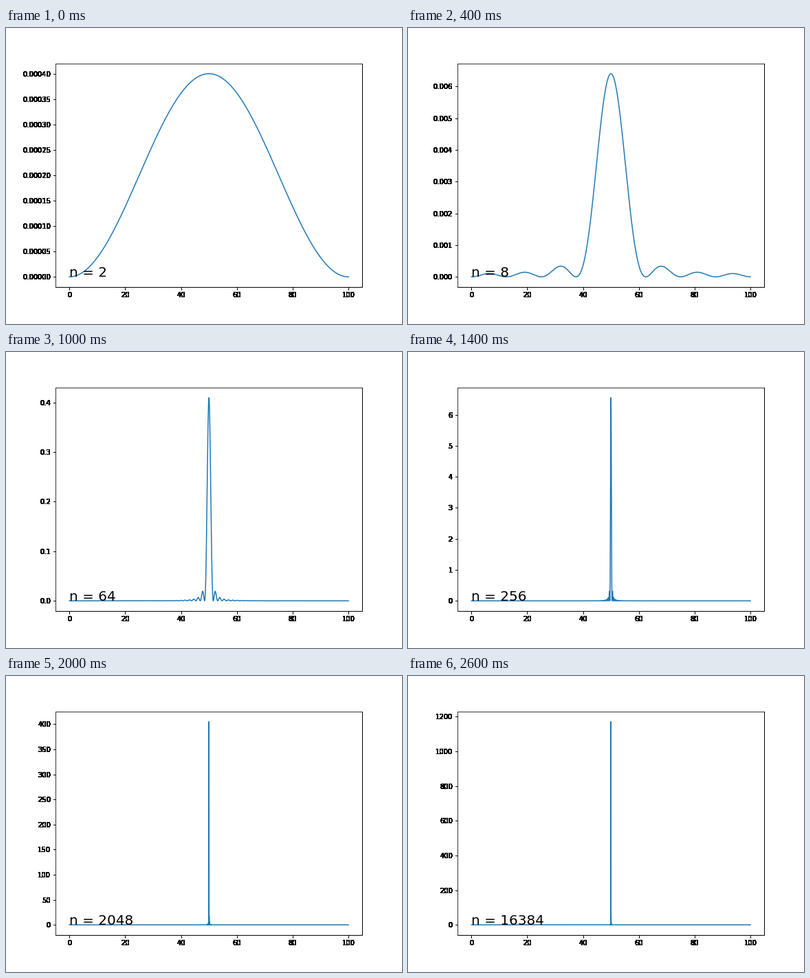
These frames come from a looping animation (576x432 px, 2.8 s). A matplotlib script:

```python
import numpy as np
import matplotlib.pyplot as plt
from matplotlib.animation import FuncAnimation

FRAMES = 14
INTERVAL = 200

x = np.linspace(0, 100, 10000)
phase = np.pi * (x - 50) / 100


def intensity(n):
    """Interference pattern of n slits."""
    return 1e-4 * (np.sin(n * phase) / np.sin(phase)) ** 2


def harden(rgba, dpi):
    """Make every touched pixel opaque, so text outside the axes has hard edges."""
    rgba[..., 3] = rgba[..., 3] > 0
    return rgba, 0, 0


fig = plt.figure(figsize=(8, 6), dpi=72, facecolor="white")
fig.subplots_adjust(left=0.125, right=0.9, bottom=0.125, top=0.88)
ax = fig.add_subplot()
ax.set_agg_filter(harden)
line, = ax.plot(x, intensity(2))
label = ax.text(0, 0, "n = 2", fontsize=20)


def update(i):
    n = 2 ** (i + 1)
    line.set_ydata(intensity(n))
    label.set_text(f"n = {n}")
    ax.relim()
    ax.autoscale_view()
    return line, label


anim = FuncAnimation(fig, update, frames=FRAMES, interval=INTERVAL,
                     init_func=lambda: update(0), repeat=True, repeat_delay=0)
plt.show()
```
